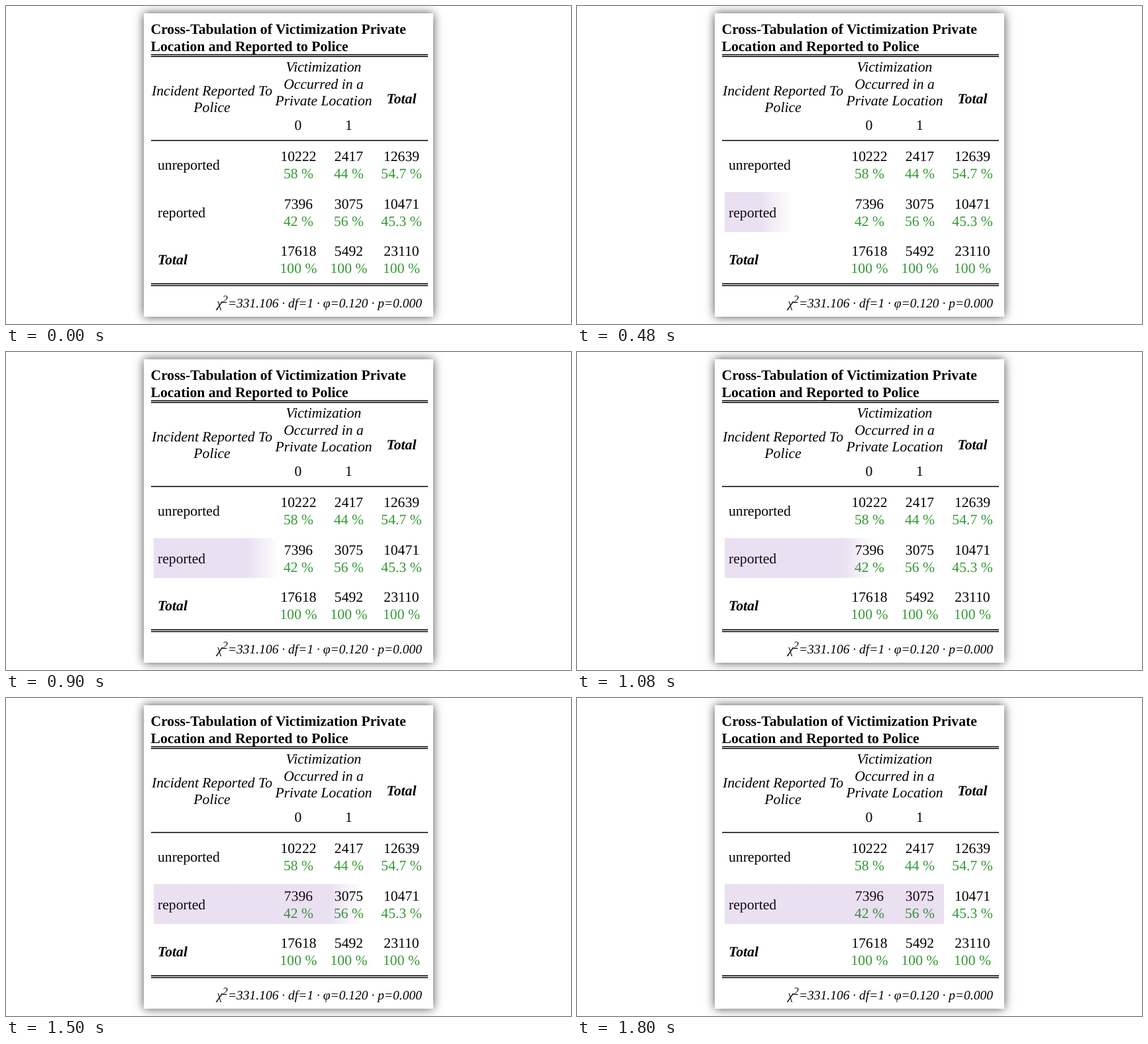
Animation, 853 px wide and 480 px high, one loop 1.86 s. Source, as an HTML page:

```html
<!DOCTYPE html>
<html lang="en">
<head>
<meta charset="utf-8">
<title>Cross-tabulation</title>
<style>
  html, body { margin: 0; width: 100%; height: 100%; overflow: hidden; background: #fff; }
  #card { position: absolute; left: 208px; top: 11px; width: 437px; height: 458px;
          background: #fff; box-shadow: 0 0 14px rgba(0, 0, 0, .7); }
  svg { position: absolute; left: 0; top: 0; }
  text { font: 21.65px "Liberation Serif", "Times New Roman", serif; text-rendering: geometricPrecision; }
  .b { font-weight: bold; }
  .i { font-style: italic; }
  .m { text-anchor: middle; }
  .pct { fill: #393; }
  .note { font-size: 19.5px; text-anchor: end; }
</style>
</head>
<body>
<div id="card"></div>
<svg id="stage" width="853" height="480" viewBox="0 0 853 480">
  <defs>
    <linearGradient id="fade" gradientUnits="userSpaceOnUse" x1="0" x2="1" y1="0" y2="0">
      <stop offset="0" stop-color="#7030a0" stop-opacity=".15"/>
      <stop offset="1" stop-color="#7030a0" stop-opacity="0"/>
    </linearGradient>
  </defs>
  <path d="M219 73.5H637M219 76.2H637M219 203H637M219 419.3H637M219 422H637" stroke="#000" stroke-width="1.4"/>
  <g id="labels"></g>
  <text class="i note" x="628" y="455">χ<tspan dy="-7" font-size="16.2">2</tspan><tspan dy="7">=331.106 · df=1 · φ=0.120 · p=0.000</tspan></text>
  <rect x="223" y="281" width="331" height="60" fill="url(#fade)"/>
</svg>
<script>
const LOOP = 1860, STEP = 60, FEATHER = 48;
const labels = document.getElementById("labels");
const fade = document.getElementById("fade");

function put(str, x, y, cls = "") {
  const t = document.createElementNS("http://www.w3.org/2000/svg", "text");
  t.setAttribute("x", x);
  t.setAttribute("y", y);
  t.setAttribute("class", cls);
  t.textContent = str;
  labels.append(t);
}

put("Cross-Tabulation of Victimization Private", 218.5, 42, "b");
put("Location and Reported to Police", 218.5, 68, "b");
put("Incident Reported To", 311, 135, "i m");
put("Police", 311, 160, "i m");
put("Victimization", 479.5, 99, "i m");
put("Occurred in a", 479.5, 124.5, "i m");
put("Private Location", 479.5, 150, "i m");
put("Total", 597, 147, "b i m");

const cols = [441.5, 517.5, 597];
put("0", 441, 187, "m");
put("1", 517.5, 187, "m");

const rows = [
  ["unreported", "", [10222, 2417, 12639], [58, 44, 54.7]],
  ["reported", "", [7396, 3075, 10471], [42, 56, 45.3]],
  ["Total", "b i", [17618, 5492, 23110], [100, 100, 100]]
];
rows.forEach(([name, cls, counts, shares], r) => {
  const y = 234 + r * 71.6;
  put(name, 229, y + 13, cls);
  cols.forEach((x, c) => {
    put(counts[c], x, y, "m");
    put(shares[c] + " %", x, y + 26, "m pct");
  });
});

// Soft-edged highlight wiping from left to right
function draw(now) {
  const t = Math.floor(now % LOOP / STEP) * STEP;
  const edge = t === 0 ? 200 : t >= 1800 ? 620 : 226 + 0.207 * t;
  fade.setAttribute("x1", edge - FEATHER);
  fade.setAttribute("x2", edge);
}

let start;
function tick(now) {
  start ??= now;
  draw(now - start);
  requestAnimationFrame(tick);
}
draw(0);
requestAnimationFrame(tick);
</script>
</body>
</html>
```
